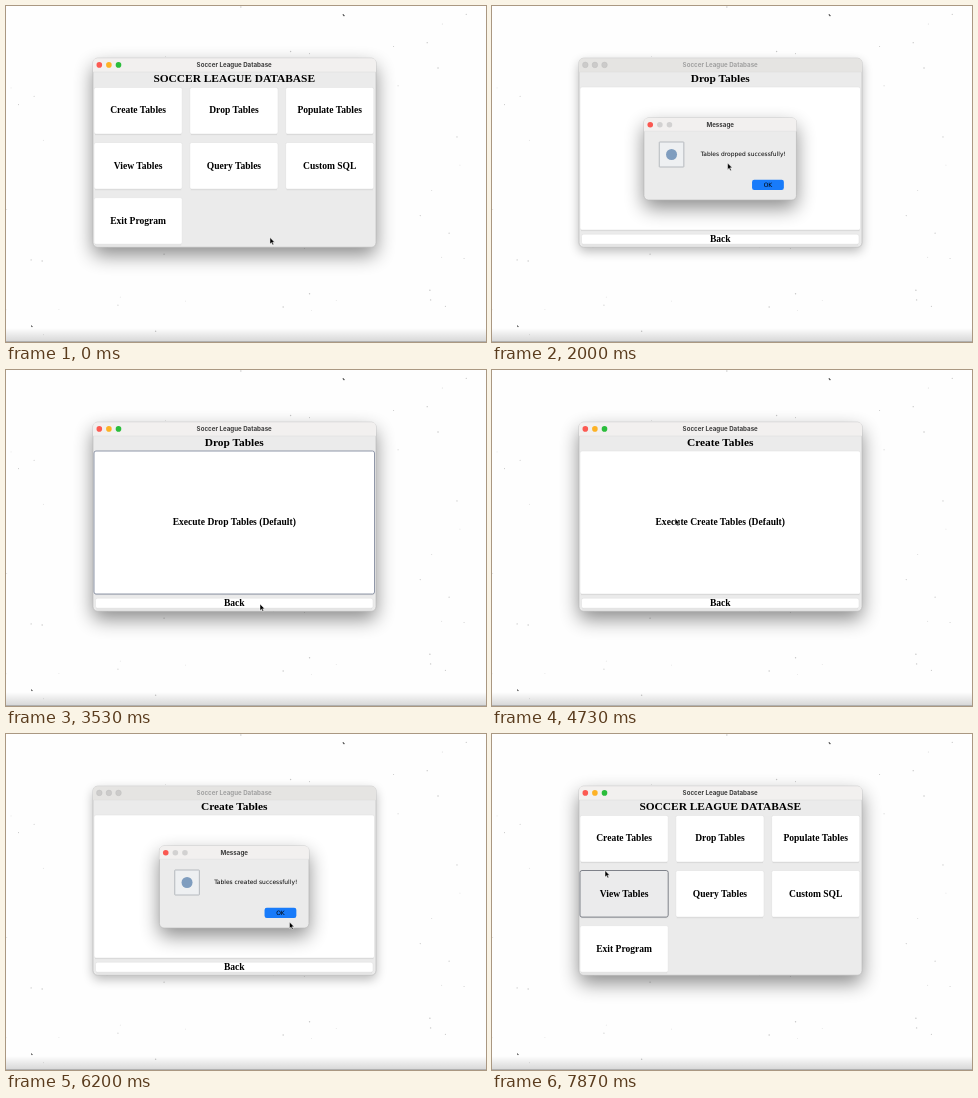
Write an HTML page that moves like this. It is 480 px wide and 336 px high and loops after 8 s.

```html
<!DOCTYPE html>
<html lang="en">
<head>
<meta charset="utf-8">
<title>Soccer League Database</title>
<style>
html, body { margin: 0; width: 100%; height: 100%; overflow: hidden; background: #fefefe; }
svg { display: block; }
text { text-anchor: middle; fill: #000; }
.serif { font: bold 9.55px "Liberation Serif", "Times New Roman", serif; }
.heading { font-size: 11.4px; }
.bar { font: 700 6.2px Inter, Roboto, sans-serif; fill: #3c3c3c; }
.note { font: 5.95px "DejaVu Sans", "Noto Sans", sans-serif; }
.top { fill: #f2f0ef; }
.btn rect { fill: #fff; stroke: #dcdcdc; stroke-width: .5; }
.btn.focus rect { stroke: #858da0; stroke-width: .9; }
.btn.press rect { fill: #ebebec; stroke: #73767f; stroke-width: .9; }
.inactive .top { fill: #e5e4e2; }
.inactive .bar { fill: #a0a0a0; }
.inactive .light { fill: #cccbca; stroke: #bababa; stroke-width: .4; }
</style>
</head>
<body>
<svg id="stage" width="480" height="336" viewBox="0 0 480 336"></svg>
<script>
const LOOP = 8000, FRAME = 1000 / 15, PRESS = 70;
const WIN = { x: 87, y: 52.2, w: 283, h: 189 }, MID = 228.2;

// Each round: open a page, run it, confirm the dialog, go back to the menu.
const ROUNDS = [
  { name: "Drop Tables", done: "dropped", width: 152.5,
    open: 870, run: 1270, ask: 1530, close: 2870, back: 3670 },
  { name: "Create Tables", done: "created", width: 149.5,
    open: 4270, run: 4800, ask: 5330, close: 6530, back: 7200 }
];
const LAST_PRESS = 7870;

// Pointer moves: start, end, x, y
const HOME = [264, 231.5];
const MOVES = [
  [0, 330, 212, 139], [530, 735, 213, 117], [870, 1200, 215, 145],
  [1530, 2530, 259.5, 171], [2530, 2735, 283, 177.5], [2870, 3530, 254, 234],
  [3800, 4200, 168, 115], [4470, 4735, 183, 148.5], [5330, 6200, 283.5, 188],
  [6200, 6340, 278, 178], [6530, 7070, 231, 233], [7200, 7735, 113, 136.5]
];

const label = (x, y, text, cls = "serif") => `<text class="${cls}" x="${x}" y="${y}">${text}</text>`;
const box = (x, y, w, h, r, more = "") =>
  `<rect x="${x}" y="${y}" width="${w}" height="${h}" rx="${r}" ${more}/>`;
const button = (id, x, y, w, h, text) =>
  `<g class="btn" data-id="${id}">` +
  `<path d="M${x + 1} ${y + h + .6}h${w - 2}" stroke="#cfcfcf" stroke-width=".7"/>` +
  box(x, y, w, h, 2) + label(x + w / 2, y + h / 2 + 2.7, text) + "</g>";
const shadow = ({ x, y, w, h }, cls, blur, drop, opacity) =>
  box(x, y + drop, w, h, 5, `class="${cls}" filter="url(#${blur})" opacity="${opacity}"`);

function frame({ x, y, w, h }, bar, title, colors) {
  return box(x, y, w, h, 4.5, 'fill="#ebebeb" stroke="#b5b5b5" stroke-width=".6"') +
    `<path class="top" d="M${x} ${y + bar}v${4.5 - bar}q0-4.5 4.5-4.5h${w - 9}q4.5 0 4.5 4.5v${bar - 4.5}z"/>` +
    `<path d="M${x} ${y + bar}h${w}" stroke="#dadada" stroke-width=".5"/>` +
    colors.map((c, i) => `<circle class="light" cx="${x + 6.3 + i * 9.6}" cy="${y + 6.7}" r="2.8" fill="${c}"/>`).join("") +
    label(MID, y + 8.9, title, "bar");
}

function background() {
  let seed = 7, out = "";
  const rand = () => (seed = seed * 16807 % 2147483647) / 2147483647;
  for (let i = 0; i < 70; i++)
    out += `<circle cx="${rand() * 480}" cy="${rand() * 330}" r="${.35 + rand() * .4}" fill="#c6c6c6"/>`;
  return out + '<path d="M336.8 8.4l1.6 1.6M25.2 319.6l1.2 1.4" stroke="#444" stroke-width="1.1"/>' +
    box(0, 322, 480, 14, 0, 'fill="url(#floor)"') +
    '<path d="M0 335.5h480" stroke="#b0b0b0"/>';
}

function menu() {
  const names = ["Create Tables", "Drop Tables", "Populate Tables",
    "View Tables", "Query Tables", "Custom SQL", "Exit Program"];
  return label(MID, 76, "SOCCER LEAGUE DATABASE", "serif heading") + names.map((name, i) =>
    button(name, 88 + i % 3 * 95.8, 81.4 + Math.floor(i / 3) * 55.1, 88.2, 46.6, name)).join("");
}

const action = name => label(MID, 76, name, "serif heading") +
  button("run", 88, 81, 280.5, 143, `Execute ${name} (Default)`) +
  button("back", 89.5, 228.2, 277.5, 10, "Back");

function dialog({ width: w, done }) {
  const x = MID - w / 2, area = { x, y: 112, w, h: 82 };
  return `<g class="dialog">` + shadow(area, "", "soft", 8, .45) +
    frame(area, 13.2, "Message", ["#fa5750", "#d2d1d1", "#d2d1d1"]) +
    box(x + 15.3, 136, 24.6, 25, .5, 'fill="#eef0f2" stroke="#a8acb2" stroke-width=".8"') +
    `<circle cx="${x + 27.6}" cy="148.5" r="5.5" fill="#7f9dbf"/>` +
    label(x + w - 53.2, 150.1, `Tables ${done} successfully!`, "note") +
    box(x + w - 44.4, 173.8, 31.8, 10.2, 2.2, 'class="ok"') +
    label(x + w - 28.5, 181.1, "OK", "note") + "</g>";
}

const blur = (id, size) => `<filter id="${id}" x="-40%" y="-50%" width="180%" height="200%">
  <feGaussianBlur stdDeviation="${size}"/></filter>`;
const page = (id, content) => `<g class="page" data-page="${id}">${content}</g>`;

const stage = document.getElementById("stage");
stage.innerHTML = `<defs>${blur("soft", 9.5)}${blur("tight", 5.5)}
  <linearGradient id="floor" x2="0" y2="1"><stop stop-opacity="0"/>
  <stop offset="1" stop-opacity=".16"/></linearGradient></defs>` + background() +
  `<g id="main">` + shadow(WIN, "on", "soft", 8, .45) + shadow(WIN, "off", "tight", 4, .28) +
  frame(WIN, 13.8, "Soccer League Database", ["#fc5a52", "#fdb225", "#2abd3b"]) +
  page("menu", menu()) + ROUNDS.map(r => page(r.name, action(r.name))).join("") + "</g>" +
  ROUNDS.map(dialog).join("") +
  `<path id="pointer" d="M0 0V6.6L1.6 5.2L2.6 7.6L3.8 7.1L2.7 4.8H4.7Z"
    stroke="#fff" stroke-width=".5" stroke-linejoin="round"/>`;

const all = sel => [...stage.querySelectorAll(sel)];
const [main, pointer, on, off] = ["#main", "#pointer", ".on", ".off"].map(s => stage.querySelector(s));
const pages = all(".page"), buttons = all(".btn"), dialogs = all(".dialog"), oks = all(".ok");
const show = (el, yes) => { el.style.display = yes ? "" : "none"; };
const ramp = (t, from, span) => Math.min(1, Math.max(0, (t - from) / span));

function tip(t) {
  let [x, y] = HOME;
  for (const [from, to, nx, ny] of MOVES) {
    const u = ramp(t, from, to - from), k = u * u * (3 - 2 * u);
    x += (nx - x) * k;
    y += (ny - y) * k;
  }
  return [x, y];
}

function pressedAt(t) {
  const within = (from, to) => t >= from && t < to;
  for (const r of ROUNDS) {
    if (within(r.open - PRESS, r.open)) return r.name;
    if (within(r.run, r.ask)) return "run";
    if (within(r.close - 2 * PRESS, r.close)) return "ok";
    if (within(r.back - PRESS, r.back)) return "back";
  }
  return t >= LAST_PRESS ? "View Tables" : "";
}

function draw(t) {
  const round = ROUNDS.find(r => t >= r.open && t < r.back);
  const modal = !!round && t >= round.ask && t < round.close;
  const focus = !!round && t >= round.close;
  const pressed = pressedAt(t);

  main.classList.toggle("inactive", modal);
  show(on, !modal);
  show(off, modal);
  pages.forEach(p => show(p, p.dataset.page === (round ? round.name : "menu")));
  buttons.forEach(b => {
    b.classList.toggle("press", b.dataset.id === pressed);
    b.classList.toggle("focus", focus && b.dataset.id === "run");
  });
  oks.forEach(b => b.setAttribute("fill", pressed === "ok" ? "#0c62d6" : "#187bfa"));
  ROUNDS.forEach((r, i) => {
    const grow = ramp(t, r.ask - FRAME, 200), alpha = grow * (1 - ramp(t, r.close - FRAME, 200));
    show(dialogs[i], t >= r.ask && alpha > 0);
    dialogs[i].setAttribute("opacity", alpha);
    dialogs[i].setAttribute("transform",
      `translate(${MID} 153) scale(${.9 + .1 * grow}) translate(${-MID} -153)`);
  });
  pointer.setAttribute("transform", `translate(${tip(t)})`);
}

// The screen advances at 15 frames a second.
const start = performance.now();
function tick(now) {
  const ms = Math.max(0, now - start) % LOOP;
  draw(Math.min(LOOP - 1, Math.floor((ms + 5) / FRAME) * FRAME + 5));
  requestAnimationFrame(tick);
}
draw(0);
requestAnimationFrame(tick);
</script>
</body>
</html>
```
